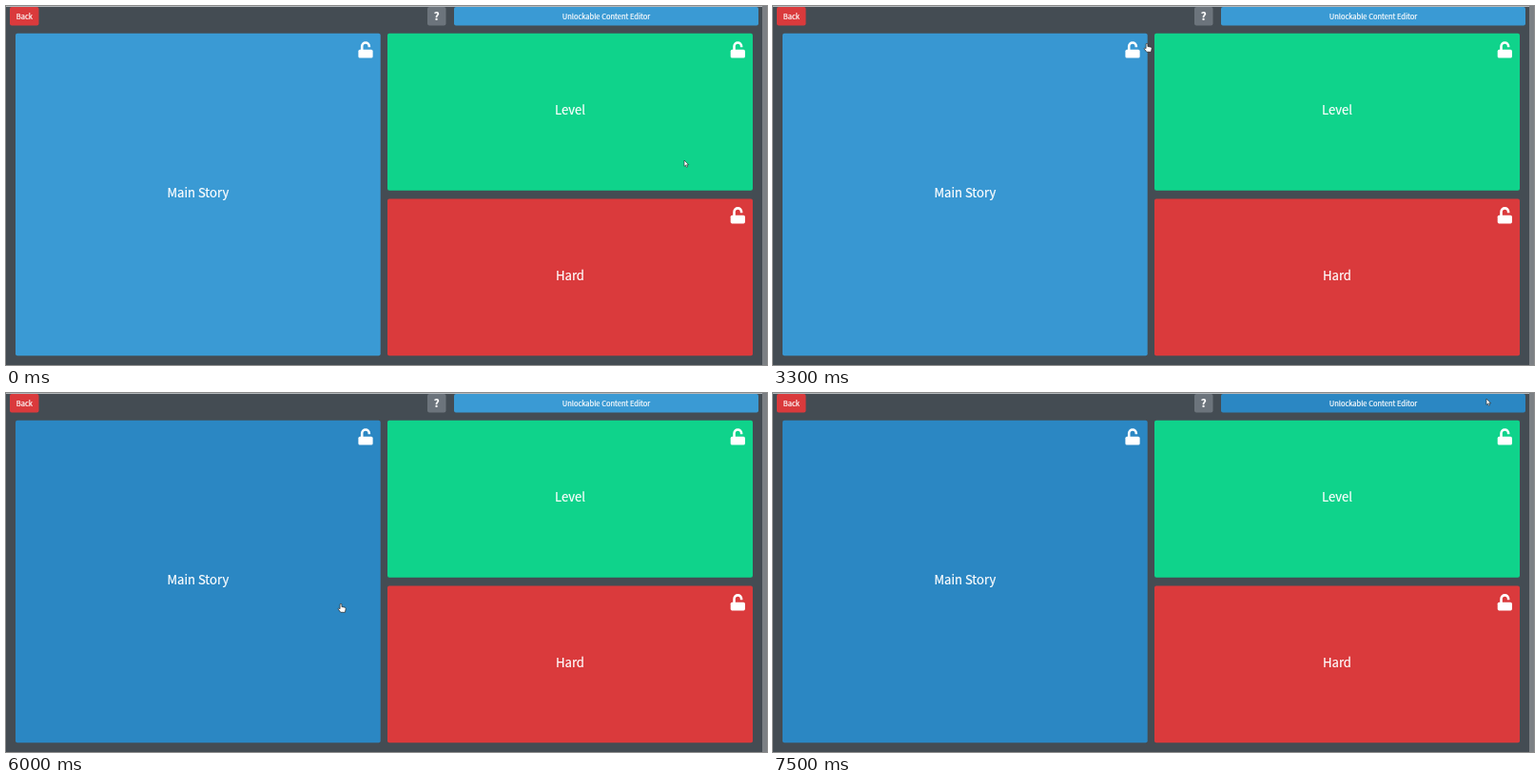
An HTML page for the animation above (7.6 s loop, 800 by 377 pixels).

```html
<!DOCTYPE html>
<html lang="en">
<head>
<meta charset="utf-8">
<title>Unlockable Content Editor</title>
<style>
  html, body { margin: 0; width: 100%; height: 100%; overflow: hidden; background: #444c53; }
  svg { display: block; width: 100vw; height: 100vh; }
  text { font-family: "Noto Sans CJK JP", "Noto Sans CJK SC", "Noto Sans CJK", "Open Sans", sans-serif;
         fill: #fff; stroke: #fff; stroke-width: .2; text-anchor: middle; }
  .title { font-size: 13.1px; }
  .label { font-size: 7.5px; }
  .lock path { fill: none; stroke: #fff; stroke-width: 76; }
  .lock rect { fill: #fff; }
  #cursor path { fill: #fff; stroke: #222; stroke-width: .6; stroke-linejoin: round; }
</style>
</head>
<body>
<svg viewBox="0 0 800 377">
  <defs>
    <g id="open" class="lock" transform="scale(.034)">
      <path d="M112 280V152a112 112 0 0 1 224 0v30" />
      <rect y="256" width="448" height="256" rx="48" />
    </g>
    <g id="closed" class="lock" transform="scale(.034)">
      <path d="M112 280V152a112 112 0 0 1 224 0v128" />
      <rect y="224" width="448" height="288" rx="48" />
    </g>
  </defs>

  <rect width="800" height="377" fill="#444c53" />
  <rect width="800" height="1" fill="#b4b8bb" />
  <rect id="scrollbar" x="795" width="5" height="377" />

  <rect x="4" y="1" width="30.5" height="19.5" rx="2" fill="#da3a3c" />
  <rect x="443" y="1" width="19.5" height="19.5" rx="2" fill="#6c747c" />
  <text class="label" x="19.4" y="13.8">Back</text>
  <text x="452.8" y="15" font-size="11.5" font-weight="700">?</text>

  <g id="panels"></g>

  <g id="cursor">
    <path id="arrow" d="M0 0V6.4L1.5 5.1 2.5 7.4 3.6 6.9 2.6 4.7H4.6Z" />
    <path id="hand" transform="scale(1.12)"
          d="M-.8 .7Q0-.5 .8 .7V3.1L3.8 3.7Q4.8 4 4.6 5L4 8.3H-.2L-2.6 5.2Q-2.5 4-.8 5Z" />
  </g>
</svg>

<script>
const LOOP = 7600, STEP = 100;
const WAKE = 1900, LOCK = 4100, UNLOCK = 5200;
const EDGE = 5; // pixels over which a panel reaches its hover colour
const $ = id => document.getElementById(id);

const blue = { light: [58, 154, 212], dark: [43, 135, 195] };
const green = { light: [15, 211, 139], dark: [14, 166, 109] };
const red = { light: [218, 58, 60], dark: [190, 44, 46] };

const panels = [
  { id: "editor", text: "Unlockable Content Editor", x: 471, y: 1, w: 320, h: 19.5, color: blue },
  { id: "story", text: "Main Story", x: 10, y: 28.7, w: 383.7, h: 338.6, color: blue, card: true },
  { id: "level", text: "Level", x: 401, y: 28.7, w: 384, h: 165, color: green, card: true },
  { id: "hard", text: "Hard", x: 401, y: 202.6, w: 384, h: 164.7, color: red, card: true }
];

const rest = { x: 713, y: 162 };
const moves = [
  { from: 600, to: 1400, x: 799, y: 209 },
  { from: WAKE, to: 3300, x: 393, y: 39 },
  { from: 3300, to: 4000, x: 379, y: 45 },
  { from: 4400, to: 4800, x: 388, y: 53 },
  { from: UNLOCK, to: 5700, x: 352, y: 221 },
  { from: 6000, to: 6600, x: 687, y: 77 },
  { from: 6800, to: 7500, x: 750, y: 6 }
];

const clamp = v => Math.max(0, Math.min(1, v));
const mix = (a, b, p) => a + (b - a) * p;
const smooth = p => p * p * (3 - 2 * p);

$("panels").innerHTML = panels.map(({ id, text, x, y, w, h, card }) => `
  <rect id="${id}" x="${x}" y="${y}" width="${w}" height="${h}" rx="2" />
  <text class="${card ? "title" : "label"}" x="${x + w / 2}" y="${y + h / 2 + (card ? 3.1 : 3)}">${text}</text>
  ${card ? `<use id="${id}Lock" href="#open" x="${x + w - 23.3}" y="${y + 8.4}" />` : ""}`).join("");

function pointerAt(t) {
  return moves.reduce((pos, { from, to, x, y }) => {
    const p = smooth(clamp((t - from) / (to - from)));
    return { x: mix(pos.x, x, p), y: mix(pos.y, y, p) };
  }, rest);
}

// Distance of the pointer from the nearest side; negative outside the panel
const depth = (pos, { x, y, w, h }) =>
  Math.min(pos.x - x, x + w - pos.x, pos.y - y, y + h - pos.y);

function draw(t) {
  const pos = pointerAt(t);
  let isHand = false;
  for (const panel of panels) {
    const inside = t < WAKE ? -1 : depth(pos, panel);
    const focused = panel.id === "story" && t >= LOCK;
    const hover = focused ? 1 : clamp(inside / EDGE);
    const { light, dark } = panel.color;
    $(panel.id).setAttribute("fill", `rgb(${light.map((v, i) => Math.round(mix(v, dark[i], hover)))})`);
    if (panel.card && inside > 0) isHand = true;
  }
  $("cursor").setAttribute("transform", `translate(${pos.x} ${pos.y})`);
  $("hand").style.display = isHand ? "" : "none";
  $("arrow").style.display = isHand ? "none" : "";
  $("scrollbar").setAttribute("fill", pos.x > 795 ? "#686c70" : "#7c8084");
  $("storyLock").setAttribute("href", t >= LOCK && t < UNLOCK ? "#closed" : "#open");
}

const start = performance.now();
function frame() {
  const t = (performance.now() - start) % LOOP;
  draw(Math.floor(t / STEP) * STEP);
  requestAnimationFrame(frame);
}
frame();
</script>
</body>
</html>
```
